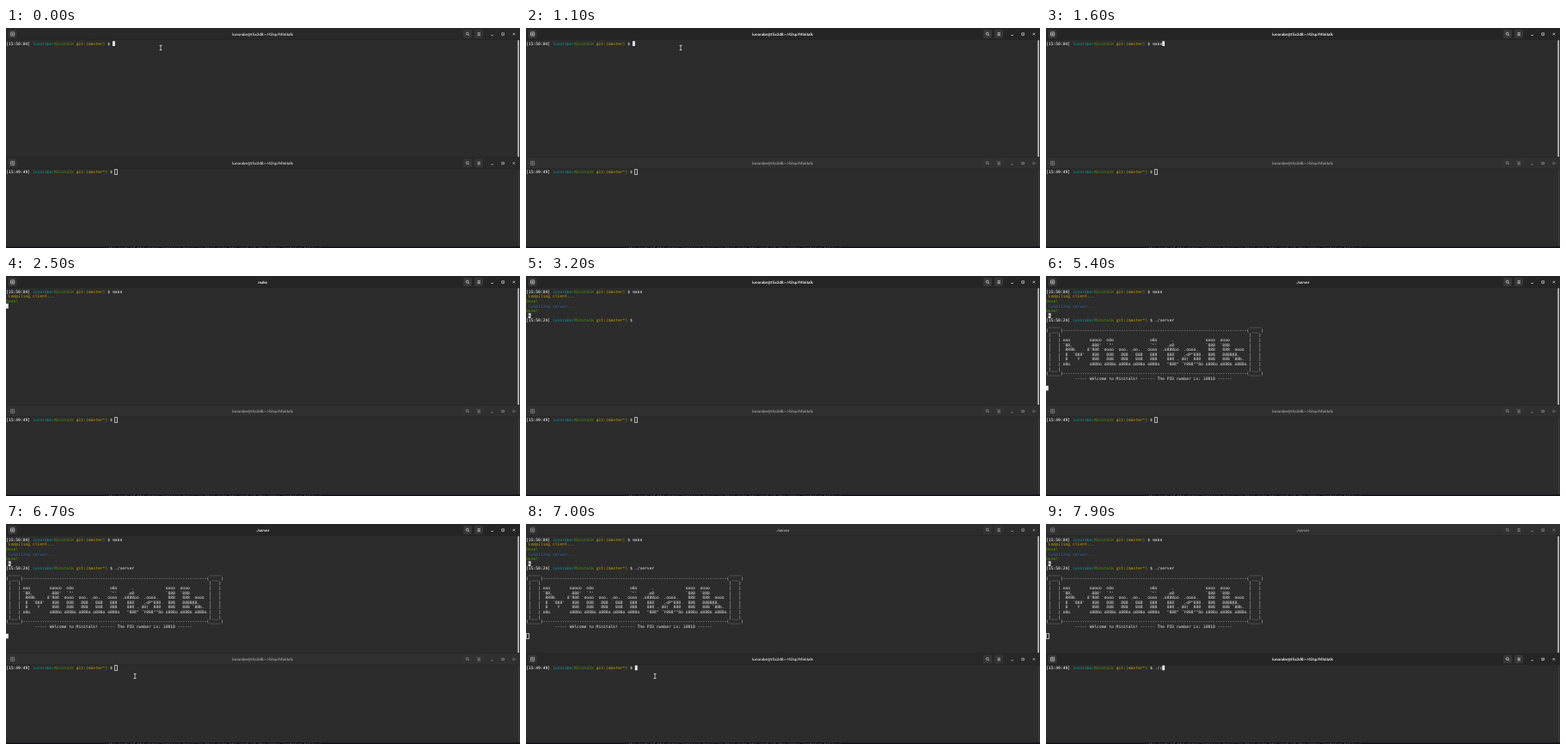
An HTML page that plays this animation: 598x256 px, repeating every 8000 ms.

```html
<!DOCTYPE html>
<html lang="en">
<head>
<meta charset="utf-8">
<title>Minitalk terminal session</title>
<style>
  html, body { margin: 0; width: 100%; height: 100%; overflow: hidden; background: #2c2c2c; }
  svg { display: block; width: 598px; height: 256px; }
  text { white-space: pre; text-rendering: geometricPrecision; }
  .mono { font: 4.681px "DejaVu Sans Mono", monospace; fill: #e4e4e4; }
  .bold { font-weight: bold; }
  .title { font: bold 4.55px Lato, "Open Sans", sans-serif; fill: #f4f4f4; text-anchor: middle; }
  .icon { fill: none; stroke: #e6e6e6; stroke-width: .7; }
</style>
</head>
<body>
<pre id="art" hidden>
ooo        ooooo  o8o               o8o      .             oooo  oooo
`88.       .888'  `"'               `"'    .o8             `888  `888
 888b     d'888  oooo  ooo. .oo.   oooo  .o888oo  .oooo.    888   888  oooo
 8  `888'   888   888   888   888   888    888    .oP"888   888   888888.
 8    Y     888   888   888   888   888    888 . d8(  888   888   888 `88b.
o8o        o888o o888o o888o o888o o888o   "888" `Y888""8o o888o o888o o888o
</pre>
<svg id="stage" viewBox="0 0 598 256" xml:space="preserve"></svg>
<script>
const LOOP = 8000, STEP = 100;
const CELL = 2.818, ROW = 5.62;
const TOP = 15.3, BOTTOM = 164.6;
const USER = 'lunorabe', HOME_TITLE = `${USER}@t5x2d8:~/42sp/Minitalk`;
const CYAN = '#06989a', GREEN = '#4e9a06', YELLOW = '#c4a000', BLUE = '#3465a4';

const stage = document.getElementById('stage');
const parts = [];
const add = s => parts.push(s);
const timed = (from, to = LOOP) => `data-from="${from}" data-to="${to}"`;
const span = (color, s) => `<tspan fill="${color}">${s}</tspan>`;

function line(top, row, content, { from = 0, bold = false, id = '', col = 0 } = {}) {
  add(`<text xml:space="preserve" class="mono ${bold ? 'bold' : ''}" x="${col * CELL}"
    y="${top + row * ROW + 4.4}" ${id && `id="${id}"`} ${timed(from)}>${content}</text>`);
}

const prompt = (time, branch) =>
  `${span('#fff', `[${time}]`)} ${span(CYAN, USER)}${span(GREEN, ':Minitalk')} ${
    span(YELLOW, `git:(${branch})`)} ${span('#fff', '$')}`;

function header(id, y) {
  const button = x => `<rect x="${x - 5}" y="2" width="10" height="10" rx="1.5" fill="#373737"/>`;
  add(`<g transform="translate(0 ${y})">
    <rect width="598" height="13.5" fill="#303030"/>
    <rect id="${id}Bar" width="598" height="13.5" fill="#252525"/>
    <path d="M0 13.5H598" stroke="#222" stroke-width=".6"/>
    <g id="${id}Items">
      ${button(7.5)}${button(537)}${button(550)}
      <g class="icon">
        <rect x="5.5" y="4.9" width="4.2" height="4.2" rx=".6"/>
        <path d="M6.6 7h2M7.6 6v2"/>
        <circle cx="536.7" cy="6.6" r="1.4"/><path d="M537.8 7.7l1.3 1.3"/>
        <path d="M548.6 5.7h3.2M548.6 7.1h3.2M548.6 8.5h3.2"/>
        <path d="M564.3 8.5h2.6"/>
        <rect x="576.9" y="5.9" width="2.4" height="2.4"/>
        <path d="M589.6 5.8l2.5 2.5M592.1 5.8l-2.5 2.5"/>
      </g>
      <text class="title" id="${id}Title" x="298.6" y="8.7">${HOME_TITLE}</text>
    </g>
  </g>`);
}

function buildWindows() {
  add('<rect width="598" height="256" fill="#2c2c2c"/>');
  header('top', 0);
  add('<rect x="595.2" y="14" width="1.8" height="136" rx=".9" fill="#b4b4b4"/>');
  add('<rect y="150" width="598" height="1" fill="#1b1b1b"/>');
  header('bottom', 150.3);
  add('<rect x="596.2" y="164" width="1" height="90" fill="#404040"/>');
  add('<rect y="254.4" width="598" height="1.6" fill="#15111a"/>');
  add(`<text class="mono" x="119" y="258" opacity=".4">${
    'the rest of the notes continue below in this page '.repeat(2).slice(0, 88)}</text>`);
}

function buildSession() {
  line(TOP, 0, prompt('15:50:04', 'master'));
  line(TOP, 0, '', { id: 'make', col: 44 });
  line(TOP, 1, span(YELLOW, ' Compiling client...'), { from: 2300 });
  line(TOP, 2, span(GREEN, 'Done!'), { from: 2500 });
  line(TOP, 3, span(BLUE, ' Compiling server...'), { from: 2600 });
  line(TOP, 4, span(GREEN, 'Done!'), { from: 2800 });
  add(`<rect x="${CELL}" y="${TOP + 5 * ROW}" width="${CELL}" height="${ROW}" fill="#eee" ${timed(2800)}/>`);
  line(TOP, 5, span('#222', ' %'), { from: 2800, bold: true });
  line(TOP, 6, prompt('15:50:24', 'master*'), { from: 2800 });
  line(TOP, 6, '', { id: 'server', col: 45 });

  const art = document.getElementById('art').textContent.trimEnd().split('\n');
  const side = ' |   | ', foot = ' |___| ', rule = '-'.repeat(76);
  const framed = (edge, middle = '') => edge + middle.padEnd(76) + edge;
  [
    framed(' _____ '), framed('( ___ )', rule), framed(side),
    ...art.map(s => framed(side, s)),
    framed(foot), framed('(_____)', rule),
    ' '.repeat(12) + '----- Welcome to Minitalk! ------ The PID number is: 10818 ------',
  ].forEach((s, i) => line(TOP, 7 + i, s, { from: 5300 }));

  line(BOTTOM, 0, prompt('15:49:49', 'master*'));
  line(BOTTOM, 0, '', { id: 'client', col: 45 });
}

function buildPointers() {
  for (const id of ['topCursor', 'bottomCursor']) add(`<rect id="${id}"/>`);
  const beam = 'M-1.5-2.7H1.5M0-2.7V2.7M-1.5 2.7H1.5';
  add(`<g id="pointer" fill="none">
    <path d="${beam}" stroke="#111" stroke-width="1.7"/>
    <path d="${beam}" stroke="#fff" stroke-width=".8"/></g>`);
}

buildWindows();
buildSession();
buildPointers();
stage.innerHTML = parts.join('');
const $ = id => document.getElementById(id);
const timedParts = [...stage.querySelectorAll('[data-from]')];

// Each entry: [time, text on the command line from then on]
const typing = {
  make: [[1200, 'm'], [1300, 'ma'], [1400, 'mak'], [1600, 'make']],
  server: [[4200, '.'], [4400, './'], [4500, './s'], [4600, './se'], [4800, './ser'], [4900, './server ']],
  client: [[7500, '.'], [7700, './'], [7900, './c']],
};
const blinkOff = [[500, 1100], [2200, 2300], [2900, 3500], [4100, 4200], [5900, 6500]];
const pointerPath = [[5500, 180, 24], [6000, 148, 165], [6100, 148, 165], [6400, 147, 188], [6700, 150, 177]];
const focusPath = {
  top: [[0, .7], [200, 1], [6800, 1], [7100, 0]],
  bottom: [[0, .6], [200, 0], [6800, 0], [7100, 1]],
};

const within = (t, [from, to]) => t >= from && t < to;
const typed = (id, t) => typing[id].reduce((s, [at, text]) => t >= at ? text : s, '');

function follow(path, t, k = 1) {
  if (t <= path[0][0]) return path[0][k];
  const i = path.findIndex(p => p[0] > t);
  if (i < 0) return path[path.length - 1][k];
  const a = path[i - 1], b = path[i];
  return a[k] + (b[k] - a[k]) * (t - a[0]) / (b[0] - a[0]);
}

// An unfocused window shows its cursor as a crisp outline on the pixel grid.
function setCursor(id, top, row, col, filled, visible) {
  const x = col * CELL, y = top + row * ROW;
  const box = filled
    ? { x, y, width: CELL, height: ROW, fill: '#f0f0f0', stroke: 'none' }
    : { x: Math.floor(x) + .5, y: Math.floor(y) + .5, width: 3, height: 6, fill: 'none', stroke: '#b4b4b4' };
  for (const name in box) $(id).setAttribute(name, box[name]);
  $(id).style.display = visible ? '' : 'none';
}

function topCell(t) {
  if (t < 2200) return [0, 44 + typed('make', t).length];
  if (t < 2300) return [1, 0];
  if (t < 2500) return [2, 0];
  if (t < 2600) return [3, 0];
  if (t < 2800) return [4, 0];
  if (t < 5300) return [6, 45 + typed('server', t).length];
  return [20, 0];
}

function topTitle(t) {
  if (t >= 5300) return './server';
  return within(t, [2200, 3000]) ? 'make' : HOME_TITLE;
}

function render(t) {
  for (const el of timedParts)
    el.style.display = within(t, [+el.dataset.from, +el.dataset.to]) ? '' : 'none';
  for (const id in typing) $(id).textContent = typed(id, t);
  for (const id in focusPath) {
    const focus = follow(focusPath[id], t);
    $(id + 'Bar').style.opacity = focus;
    $(id + 'Items').style.opacity = .55 + .45 * focus;
  }
  $('topTitle').textContent = topTitle(t);

  const switched = t >= 6900;
  setCursor('topCursor', TOP, ...topCell(t), !switched, !blinkOff.some(b => within(t, b)));
  setCursor('bottomCursor', BOTTOM, 0, 45 + typed('client', t).length, switched, true);

  const pointer = $('pointer');
  pointer.style.display = t < 1200 || within(t, [5500, 7500]) ? '' : 'none';
  const [x, y] = t < 1200 ? [180, 23] : [1, 2].map(k => follow(pointerPath, t, k));
  pointer.setAttribute('transform', `translate(${x} ${y})`);
}

const start = performance.now();
function tick() {
  const t = (performance.now() - start) % LOOP;
  render(Math.floor(t / STEP) * STEP);
  requestAnimationFrame(tick);
}
tick();
</script>
</body>
</html>
```
